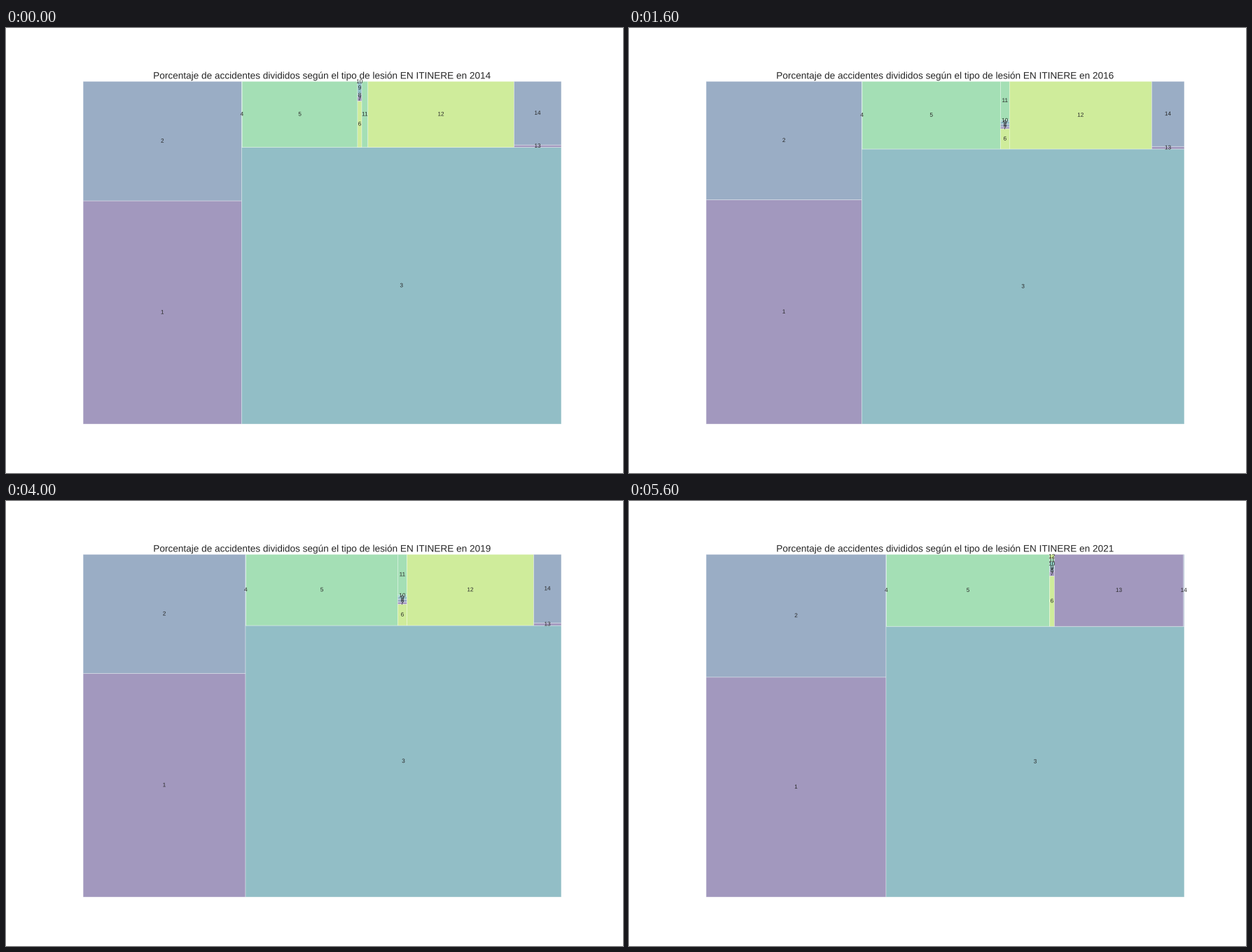
Animation of 881x636 px, one loop 6400 ms. Source, as a matplotlib script:

```python
import matplotlib.pyplot as plt
import numpy as np
from matplotlib.animation import FuncAnimation
from matplotlib.patches import PathPatch, Rectangle
from matplotlib.textpath import TextPath
from matplotlib.transforms import Affine2D

W, H, DPI = 881, 636, 49
POINT = DPI / 72
LEFT, RIGHT = 0.125 * W, 0.9 * W
TOP, BOTTOM = 0.12 * H, 0.89 * H
INK = "0.15"
PALETTE = plt.get_cmap("viridis")(np.linspace(0, 1, 8)[1:-1])
FIRST_YEAR, LAST_YEAR = 2014, 2021

# Edges in key years: left column's right side, its inner edge, bottom of the
# upper strip, then the right sides of cell 5, the narrow stack and the next
# wide cell. Years between are interpolated.
KEYS = {
    2014: (336.5, 247, 170.5, 502, 516.8, 725.4),
    2016: (332.3, 245.5, 173, 530.5, 543.3, 746.4),
    2018: (337.2, 245.5, 176.5, 548.4, 562, 747.4),
    2019: (342, 246.5, 178, 559.4, 572.6, 753.5),
    2020: (357.7, 255.2, 174.5, 576.4, 582.9, 791.8),
    2021: (367, 251.8, 179.2, 600.5, 607.4, 791.8),
}
WHOLE = [1]
EARLY_STACK = [66, 6, 4, 17, 1]
MIDDLE_STACK = [30, 3, 4, 4, 2, 57]
LATE_STACK = [70, 6, 3, 4, 7, 4, 6]
CORNER = [3.5, 96.5]

plt.rcParams["font.family"] = "Liberation Sans"

fig = plt.figure(figsize=((W + 0.01) / DPI, (H + 0.01) / DPI), dpi=DPI,
                 facecolor="white")
ax = fig.add_axes([0, 0, 1, 1])


def strip_columns(year, split, cell5, stack, wide):
    """Columns of the upper strip as (right side, weights from the bottom)."""
    columns = [(split + 0.7, WHOLE), (cell5, WHOLE)]
    if year == FIRST_YEAR:
        columns += [(cell5 + 6, EARLY_STACK), (stack, WHOLE)]
    else:
        columns.append((stack, MIDDLE_STACK if year < 2020 else LATE_STACK))
    return columns + [(wide, WHOLE), (RIGHT, CORNER if year < 2020 else WHOLE)]


def cells(year):
    """Yield (left, right, top, bottom) for each numbered cell."""
    split, inner, strip, *sides = (np.interp(year, list(KEYS), edge)
                                   for edge in zip(*KEYS.values()))
    yield LEFT, split, inner, BOTTOM
    yield LEFT, split, TOP, inner
    yield split, RIGHT, strip, BOTTOM
    left = split
    for right, weights in strip_columns(year, split, *sides):
        shares = np.cumsum([0, *weights]) / sum(weights)
        edges = strip + (TOP - strip) * shares
        for bottom, top in zip(edges, edges[1:]):
            yield left, right, top, bottom
        left = right


def write(x, baseline, text, points):
    """Centred text as a filled outline, so it is not moved to whole pixels."""
    path = TextPath((0, 0), text, size=points * POINT)
    box = path.get_extents()
    place = Affine2D().translate(-(box.x0 + box.x1) / 2, 0).scale(1, -1)
    place.translate(x, baseline)
    ax.add_patch(PathPatch(place.transform_path(path), facecolor=INK,
                           linewidth=0, zorder=3))


def draw(frame):
    ax.clear()
    ax.set(xlim=(0, W), ylim=(H, 0))
    ax.axis("off")
    year = FIRST_YEAR + frame
    for i, (x0, x1, y0, y1) in enumerate(cells(year)):
        ax.add_patch(Rectangle((x0, y0), x1 - x0, y1 - y0, alpha=0.5,
                               facecolor=PALETTE[i % len(PALETTE)],
                               edgecolor="white", linewidth=1, snap=False))
        write((x0 + x1) / 2, (y0 + y1) / 2 + 3.1 * POINT, str(i + 1), 12)
    write((LEFT + RIGHT) / 2, TOP - 5.6 * POINT,
          "Porcentaje de accidentes divididos según el tipo de lesión "
          f"EN ITINERE en {year}", 20)
    return []


anim = FuncAnimation(fig, draw, frames=LAST_YEAR - FIRST_YEAR + 1,
                     init_func=lambda: [], interval=800,
                     repeat=True, repeat_delay=0)
plt.show()
```
